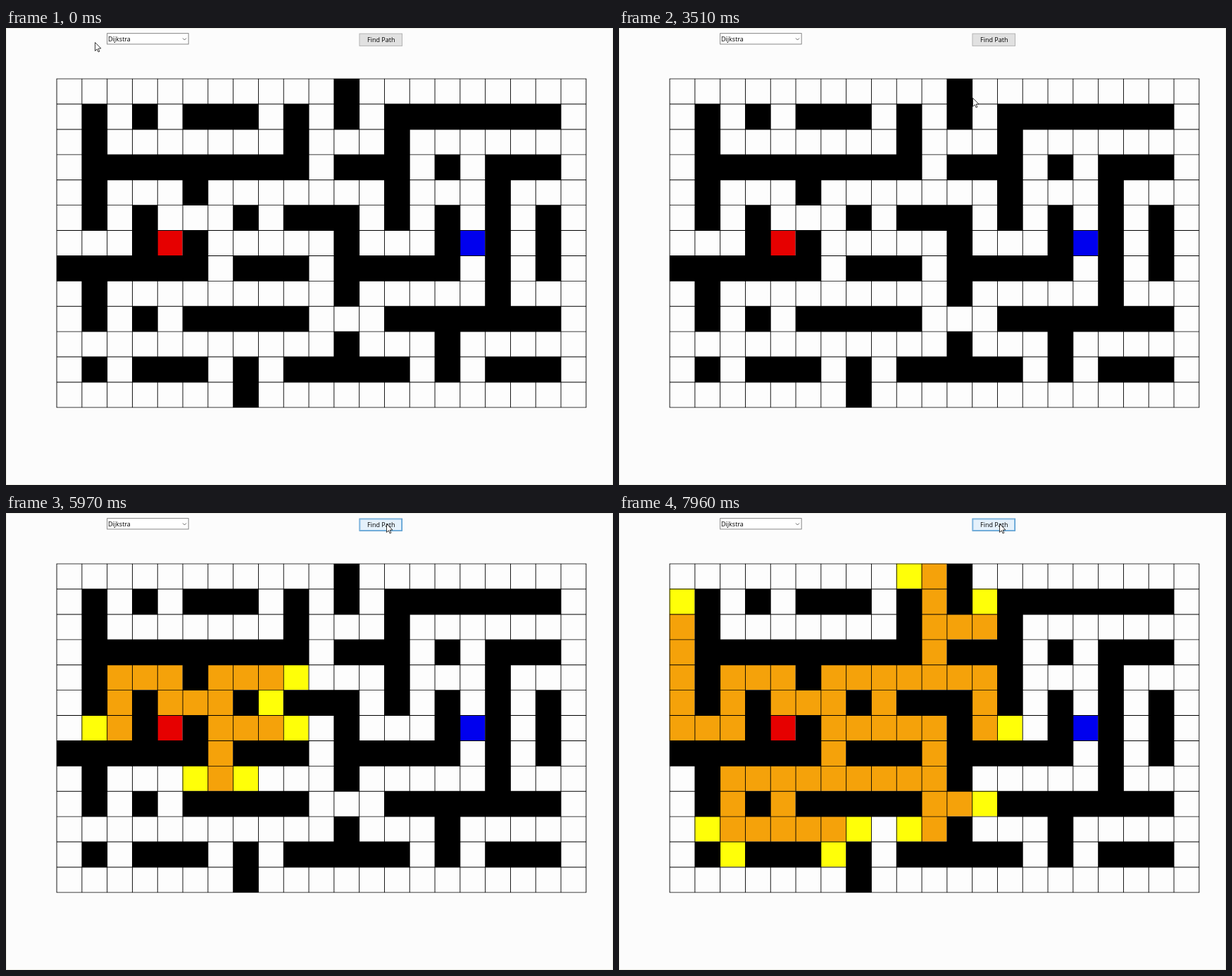
Recreate the animation shown at these times as an HTML page with a canvas. Size 862x649 px, loop 7990 ms.

```html
<!DOCTYPE html>
<html lang="en">
<head>
<meta charset="utf-8">
<title>Path finding</title>
<style>
html, body { margin: 0; width: 100%; height: 100%; overflow: hidden; background: #fcfcfc; }
canvas { display: block; }
</style>
</head>
<body>
<canvas id="stage" width="862" height="649"></canvas>
<script>
const ctx = document.getElementById('stage').getContext('2d');
const LOOP = 7990, SEARCH_START = 4094, LEVEL_TIME = 311.5;
const START = [4, 6], GOAL = [16, 6];
const LINE = 0.9;
const maze = [
  '...........#.........',
  '.#.#.###.#.#.#######.',
  '.#.......#...#.......',
  '.#########.###.#.###.',
  '.#...#.......#...#...',
  '.#.#...#.###.#.#.#.#.',
  '...#.#.....#...#.#.#.',
  '######.###.#####.#.#.',
  '.#.........#.....#...',
  '.#.#.#####...#######.',
  '...........#...#.....',
  '.#.###.#.#####.#.###.',
  '.......#.............'
];
const COLS = maze[0].length, ROWS = maze.length;
const CELL_W = 35.8, CELL_H = 35.9;
const gridX = c => 71.6 + CELL_W * c;
const gridY = r => 71.7 + CELL_H * r;

// Distance of every open cell from the start
const dist = maze.map(() => Array(COLS).fill(Infinity));
dist[START[1]][START[0]] = 0;
for (const queue = [START]; queue.length;) {
  const [c, r] = queue.shift();
  for (const [x, y] of [[c + 1, r], [c - 1, r], [c, r + 1], [c, r - 1]]) {
    if (maze[y]?.[x] === '.' && dist[y][x] === Infinity) {
      dist[y][x] = dist[r][c] + 1;
      queue.push([x, y]);
    }
  }
}

// Grid lines and walls share one path, so their soft edges do not add up
const ink = new Path2D();
for (let c = 0; c <= COLS; c++) ink.rect(gridX(c), gridY(0), LINE, CELL_H * ROWS + LINE);
for (let r = 0; r <= ROWS; r++) ink.rect(gridX(0), gridY(r), CELL_W * COLS + LINE, LINE);
eachCell((c, r) => {
  if (maze[r][c] === '#') ink.rect(gridX(c), gridY(r), CELL_W + LINE, CELL_H + LINE);
});

function eachCell(visit) {
  for (let r = 0; r < ROWS; r++) {
    for (let c = 0; c < COLS; c++) visit(c, r);
  }
}

// Pointer stops: time, x, y
const pointerPath = [
  [0, 126, 20], [300, 126, 20], [1250, 149, 58], [2600, 149, 58],
  [3180, 440, 464], [3290, 466, 448], [3510, 502, 99], [3850, 540, 15]
];

function pointerAt(t) {
  const i = pointerPath.findIndex(p => p[0] > t);
  if (i < 0) return pointerPath[pointerPath.length - 1].slice(1);
  const [t0, x0, y0] = pointerPath[i - 1], [t1, x1, y1] = pointerPath[i];
  const k = (t - t0) / (t1 - t0);
  return [Math.round(x0 + (x1 - x0) * k), Math.round(y0 + (y1 - y0) * k)];
}

function box(x, y, w, h, fill, border, line = LINE) {
  ctx.fillStyle = border;
  ctx.fillRect(x, y, w, h);
  ctx.fillStyle = fill;
  ctx.fillRect(x + line, y + line, w - 2 * line, h - 2 * line);
}

function label(text, x, y) {
  ctx.font = '9px "Open Sans", "Noto Sans", sans-serif';
  ctx.fillStyle = '#000';
  ctx.fillText(text, x, y);
}

function polyline(points, x, y) {
  ctx.beginPath();
  points.forEach(([px, py]) => ctx.lineTo(x + px, y + py));
}

function drawControls(t, [px, py]) {
  box(143.2, 7.2, 116.4, 16.2, '#fff', '#7a7a7a');
  label('Dijkstra', 145, 19);
  polyline([[0, 0], [2.5, 2.5], [5, 0]], 251, 14.5);
  ctx.strokeStyle = '#555';
  ctx.lineWidth = LINE;
  ctx.stroke();

  const hover = px > 501 && px < 563 && py > 7 && py < 26;
  const focused = t >= SEARCH_START;
  box(501.5, 7.6, 61.5, 18.2, hover ? '#e5f1fb' : '#e1e1e1', hover ? '#3f8cc6' : '#adadad');
  if (focused) box(502.4, 8.5, 59.7, 16.4, '#e5f1fb', '#74b2e0');
  label('Find Path', 513, 20);
}

function cellColor(c, r, level) {
  if (c === START[0] && r === START[1]) return '#e60000';
  if (c === GOAL[0] && r === GOAL[1]) return '#0000ee';
  if (dist[r][c] <= level) return '#f5a20a';
  return dist[r][c] === level + 1 ? '#ffff08' : '#fdfdfd';
}

function drawMaze(t) {
  const level = t < SEARCH_START ? -1 : Math.floor((t - SEARCH_START) / LEVEL_TIME);
  eachCell((c, r) => {
    ctx.fillStyle = cellColor(c, r, level);
    ctx.fillRect(gridX(c), gridY(r), CELL_W + LINE, CELL_H + LINE);
  });
  ctx.fillStyle = '#000';
  ctx.fill(ink);
}

function drawPointer([x, y]) {
  polyline([[0, 0], [0, 12], [2.8, 9.4], [4.6, 13.5], [6.4, 12.7], [4.6, 8.7], [8.4, 8.5]], x + 0.5, y + 0.5);
  ctx.closePath();
  ctx.fillStyle = '#fff';
  ctx.fill();
  ctx.strokeStyle = '#222';
  ctx.lineWidth = LINE;
  ctx.stroke();
}

function draw(now) {
  const t = now % LOOP, pointer = pointerAt(t);
  box(0, 0, 862, 649, '#fcfcfc', '#ecece6', 1);
  drawControls(t, pointer);
  drawMaze(t);
  drawPointer(pointer);
  requestAnimationFrame(draw);
}

requestAnimationFrame(draw);
</script>
</body>
</html>
```
